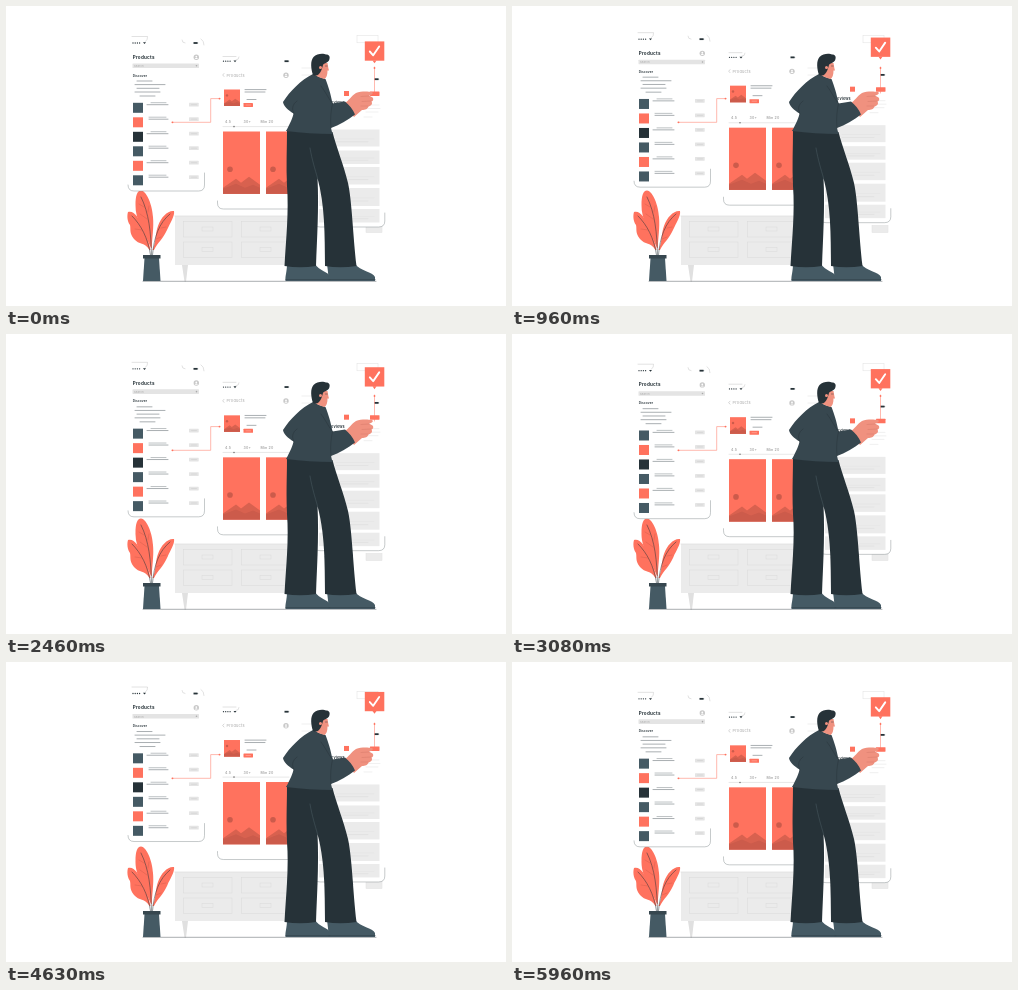
Write an HTML page that moves like this. It is 500 by 300 pixels and loops after 6 s.

```html
<!DOCTYPE html>
<html lang="en">
<head>
<meta charset="utf-8">
<title>Product screens</title>
<style>
  html, body { margin: 0; width: 100%; height: 100%; overflow: hidden; background: #fff; }
  svg { display: block; width: 100%; height: 100%; }
  text { font-family: Inter, Roboto, sans-serif; }
</style>
</head>
<body>
<svg viewBox="0 0 500 300">
  <g id="room"></g>
  <g id="list"></g>
  <g id="detail"></g>
  <g id="reviews"></g>
  <g id="links"></g>
  <g id="check"></g>
  <g id="person"></g>
</svg>
<script>
const CORAL = '#ff725e', SHADE = '#cc5b4b', NIGHT = '#263238', SLATE = '#455a64',
      JACKET = '#37474f', SKIN = '#f0917f', PALE = '#ebebeb', GREY = '#e0e0e0', EDGE = '#80888c';

const $ = id => document.getElementById(id);
const rect = (x, y, w, h, fill, extra = '') =>
  `<rect x="${x}" y="${y}" width="${w}" height="${h}" fill="${fill}" ${extra}/>`;
const frame = (x, y, w, h, color = GREY, width = 0.5) =>
  rect(x, y, w, h, 'none', `stroke="${color}" stroke-width="${width}"`);
const shape = (d, fill) => `<path d="${d}" fill="${fill}"/>`;
const line = (d, color = NIGHT, width = 0.5) =>
  `<path d="${d}" fill="none" stroke="${color}" stroke-width="${width}" stroke-linecap="round" stroke-linejoin="round"/>`;
const dash = (x1, x2, y, color = '#555f64', width = 0.5) => line(`M${x1} ${y}H${x2}`, color, width);
const dot = (x, y, r, fill) => `<circle cx="${x}" cy="${y}" r="${r}" fill="${fill}"/>`;
const label = (x, y, size, str, fill = NIGHT, weight = 600, gap = 0.2) =>
  `<text x="${x}" y="${y}" font-size="${size}" font-weight="${weight}" letter-spacing="${gap}" fill="${fill}">${str}</text>`;

const statusBar = (x, y, right) =>
  [0, 2.2, 4.4, 6.6].map(d => dot(x + d, y, 0.65, NIGHT)).join('') +
  shape(`M${x + 10} ${y - 0.7}h3l-1.5 1.8z`, NIGHT) +
  rect(right - 4.5, y - 0.9, 4, 1.8, NIGHT) + rect(right - 0.5, y - 0.4, 0.6, 0.8, NIGHT);

const avatar = (x, y) => dot(x, y, 2.7, '#c9c9c9') + dot(x, y - 0.6, 0.9, '#fff') +
  shape(`M${x - 1.6} ${y + 1.7}q1.6 -2.4 3.2 0z`, '#fff');

// Picture placeholder with a sun and two ranges of hills.
function picture(x, y, w, h) {
  const ground = y + h, s = w / 37;
  return rect(x, y, w, h, CORAL) + dot(x + 7 * s, ground - 24.5 * s, 2.8 * s, SHADE) +
    shape(`M${x} ${ground - 6 * s}l${13 * s} ${-9 * s}l${5 * s} ${4 * s}l${8 * s} ${-6 * s}L${x + w} ${ground - 9 * s}V${ground}H${x}z`, '#d8614f') +
    shape(`M${x} ${ground - 5 * s}l${13 * s} ${-5 * s}l${9 * s} ${4 * s}l${8 * s} ${-3 * s}l${7 * s} ${3 * s}V${ground}H${x}z`, SHADE);
}

function drawRoom() {
  let out = frame(351, 29.5, 21, 7.3) + frame(289, 62, 20, 7) +
    rect(360, 219.5, 16, 7, PALE) + frame(360, 219.5, 16, 7);
  out += shape('M176 259h6l-2 16.5h-1.5z', GREY) + rect(169, 210, 126, 49, PALE) +
    dash(169, 295, 210, GREY, 0.8);
  for (const x of [177.5, 235.5]) for (const y of [215.5, 236])
    out += frame(x, y, 48.5, 15.5, '#d9d9d9') + frame(x + 18.5, y + 5.5, 11, 4, '#d9d9d9');
  out += dash(137, 370, 275.3, NIGHT, 0.4);
  out += shape('M143.500 244C139 236 133 239 128 233C123 227 125 223 124 219C121 215 121 209 122 206C128 204 133 212 136 220C140 228 143 236 144.500 244z', CORAL) +
    shape('M145 242C139 227 129 214 129.500 199C129.500 190 131 184.500 135 184.500C141 185 146.500 200 147 211C148 222 146 232 145.800 242z', CORAL) +
    shape('M146.500 244C150 238 149 228 152 220C155 211 162 204 168 205C169 210 164 217 161 224C157 233 152 236 148 244z', CORAL);
  out += line('M145.5 249C145 227 143 207 135 191M144.5 249C142 232 135 219 126 210M146.5 249C148 231 153 217 164 208', NIGHT, 0.5) +
    line('M138 201l-5 -3M141 213l-7 -5M142 206l1 -6M136 224l-7 -1M155 222l5 -1M150 233l5 -2', SHADE, 0.4);
  return out + shape('M138.5 252h14.5l1.5 23h-17.5z', SLATE) + rect(137, 249, 17.5, 3.5, JACKET);
}

function drawList() {
  let out = rect(122, 30, 76.5, 155, '#fff', 'rx="7"') +
    line('M122 179q0 6 6 6H192.5q6 0 6 -6V167', EDGE, 0.45) +
    line('M126 30.5h15.5q.5 3 -2 5M176 34q0 3 3 3M195 33q3 1.500 3 6', '#aaa', 0.35) +
    statusBar(127, 37, 192) + label(126.7, 52.7, 4.6, 'Products', NIGHT, 700, 0.22) + avatar(190.3, 51.2) +
    rect(126.5, 57.5, 66.5, 4.6, '#e4e4e4', 'rx=".6"') + label(128, 61, 2.6, 'Search', '#a8a8a8', 400) +
    dot(190.5, 59.8, 0.8, '#aaa') + label(126.7, 70.6, 3.2, 'Discover', NIGHT, 600, 0.1);
  [[131, 146, 75], [129, 159, 78.6], [131, 153, 82.3], [129, 154, 86], [134, 149, 90]]
    .forEach(a => out += dash(...a));
  [SLATE, CORAL, NIGHT, SLATE, CORAL, SLATE].forEach((color, i) => {
    const y = 96.8 + i * 14.5, shift = i % 2 * 2;
    out += rect(127, y, 10, 10, color) + dash(145 - shift, 160, y - 0.1, '#7b8488') +
      dash(141 + shift, 162, y + 1.9) +
      rect(183, y, 9.7, 3.8, '#e4e4e4', 'rx=".4"') + dash(185.5, 190.5, y + 1.9, '#cacaca');
  });
  return out;
}

function drawDetail() {
  return rect(211.5, 48, 84, 155, '#fff', 'rx="6"') +
    line('M211.5 195v2q0 6 6 6H290', EDGE, 0.45) +
    line('M233 51q0 3 -3 3M217 50.5h13', '#aaa', 0.35) +
    statusBar(217.5, 55.2, 283) + line('M218 67.5l-1.3 1.5l1.3 1.5', '#999', 0.4) +
    label(220.5, 70.5, 3.9, 'Products', '#b5b5b5', 500, 0.2) + avatar(280, 69.2) +
    picture(218, 83.5, 16, 16.5) + dash(239, 260, 83.6) + dash(239, 259, 86) + dash(241, 250, 93.5) +
    rect(237.5, 97, 9.5, 4, CORAL, 'rx=".4"') + dash(240, 244.5, 99, '#ffc0b6') +
    label(219, 117.2, 3.6, '4.5', '#999', 500) + label(237.5, 117.2, 3.6, '30+', '#999', 500) +
    label(254.5, 117.2, 3.6, 'Min 20', '#999', 500) +
    dash(217, 283, 120.6, '#c4c4c4', 0.4) + dot(228, 120.6, 0.8, '#777') +
    picture(217, 125.5, 37, 62.2) + picture(260, 125.5, 37, 62.2);
}

function drawReviews() {
  let out = rect(308, 66, 70.8, 155, '#fff', 'rx="6"') +
    line('M308 215q0 6 6 6H372.5q6.3 0 6.3 -6V207', EDGE, 0.45) +
    rect(368.5, 72.3, 4, 1.8, NIGHT) + rect(372.5, 72.8, 0.6, 0.8, NIGHT) +
    rect(338, 85, 5, 5, CORAL) + rect(364, 85.5, 9.5, 4.5, CORAL, 'rx=".4"') +
    label(322.5, 98.2, 3.8, 'Reviews', NIGHT, 600, 0.15);
  [[358, 373, 99], [362, 374, 102.5], [360, 372, 106], [358, 366, 111]].forEach(a => out += dash(...a, GREY));
  [[123.5, 17], [144.5, 13.5], [161, 17.5], [182, 18], [203, 13.5]].forEach(([y, h]) => {
    out += rect(313, y, 60.5, h, PALE) + dash(330, 368, y + h * 0.55, GREY) +
      dash(330, 362, y + h * 0.72, '#d9d9d9');
  });
  return out;
}

function drawLinks() {
  return line('M166 116.3H204.7V92.6H214', CORAL, 0.5) + dot(166.5, 116.3, 0.9, CORAL) +
    dot(213.5, 92.6, 0.9, CORAL) + line('M368.5 61V87', CORAL, 0.5) + dot(368.5, 62, 0.9, CORAL);
}

function drawCheck() {
  return rect(358.8, 35.4, 19.5, 19.3, CORAL) + shape('M366.5 54.5h4l-2 2.8z', CORAL) +
    line('M363.8 45.500L367.2 49.300L373.2 40.500', '#fff', 1.9);
}

function drawPerson() {
  const shoes = shape('M281 258H309C313 265 323 266 324.5 271V275H279.5C279 270 281 266 281 258z', SLATE) +
    shape('M321 258H349C354 265 367 266 369 271V275H323C322.500 270 322 266 321 258z', SLATE) +
    line('M280 273.6H324M323 273.6H369', JACKET, 0.8);
  const trousers =
    shape('M281 124L326.5 126C330 140 338 160 342 177C346 195 347 230 350.5 260Q334 262.5 319 260C318.7 228 319 200 311.5 172C313 202 311 232 310 260Q294 262.5 278.5 260C280 233 283 206 281 180C280 160 281 142 281 124z', NIGHT) +
    line('M304 142C306 154 309 163 311.5 172', '#51626a', 0.45);
  const hand =
    shape('M338 97.5C343 95 345 90 350 87C355 85 362 85.500 366 86C368 87 366 89 363 89.500L366.500 91.500C368 93 367 95 365.500 95.500C367 98 365 100 362.500 100.500C362 103 359 104 356 104L348 111z', SKIN) +
    line('M355 90.5L363 90M356 95.5L365 95M355 100L362 100', '#d27767', 0.45);
  const jacket =
    shape('M307 68C311 70 315 72 319.500 73C322 79 325 89 326.500 97.500L339 95.500C343 99 347 103 349 108.500C342 114 333 119 325 122L326.5 128C311 128 296 127 280 125C284 118 287 111 287.5 107.5C282 104 277.5 100 277 96C284 85 295 74 307 68z', JACKET) +
    line('M291 95C287 98 285 102 288 108M326.5 97.5C325 104 324 113 325 122M315 80C319 85 322 92 326.5 97.5', NIGHT, 0.45);
  const head =
    shape('M309 57H321.5C322 60 322.3 62 323 64.500H321.5C321.5 69 320.500 71.500 318.500 73C314 72 310 70 307.500 67.500z', SKIN) +
    shape('M307 69C305 63 304 55 307.5 51C311 47 318 47.3 320 48.5C323.5 48.5 324.5 51 323 54.5C320.5 57.5 318 57 317 59C316 63 315 66 313 68C311 70 309 70 307 69z', NIGHT) +
    dot(314.5, 61.5, 1.5, SKIN) + line('M319.500 60h1.700', NIGHT, 0.45);
  return shoes + trousers + hand + jacket + head;
}

const parts = { room: drawRoom, list: drawList, detail: drawDetail, reviews: drawReviews,
                links: drawLinks, check: drawCheck, person: drawPerson };
for (const id in parts) $(id).innerHTML = parts[id]();

// Linear rise and fall of six pixels over one period.
const float = (t, period) => -6 * (1 - Math.abs(1 - 2 * (t % period) / period));
const periods = { list: 3000, detail: 3000, check: 3000, reviews: 1500 };

function render(t) {
  for (const id in periods)
    $(id).setAttribute('transform', `translate(0 ${float(t, periods[id]).toFixed(3)})`);
}

let start;
function tick(now) {
  start ??= now;
  render((now - start) % 6000);
  requestAnimationFrame(tick);
}
render(0);
requestAnimationFrame(tick);
</script>
</body>
</html>
```
